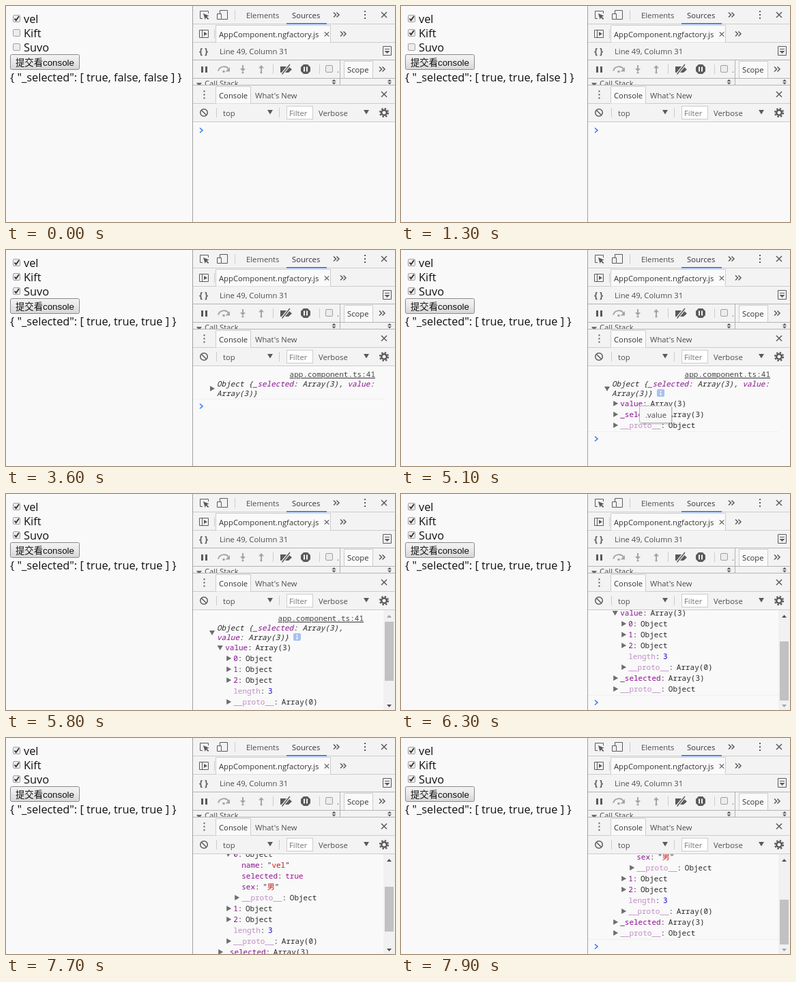
Recreate the animation shown at these times as an HTML page. Size 570 by 318 pixels, loop 8 s.

```html
<!DOCTYPE html>
<html lang="en">
<head>
<meta charset="utf-8">
<title>Checkbox form and console</title>
<style>
html, body { margin: 0; width: 100%; height: 100%; overflow: hidden; background: #f9f9f9; }
svg { display: block; }
text { white-space: pre; }
.page { font: 16.35px "Open Sans", "Noto Sans", sans-serif; fill: #111; }
.btn { font: 13.333px "Liberation Sans", "Noto Sans CJK SC", "Noto Sans CJK", sans-serif; fill: #111; }
.ui { font: 11.25px "Open Sans", "Noto Sans", sans-serif; fill: #4c4c4c; }
.log { font: 11px "Noto Sans Mono", "DejaVu Sans Mono", monospace; fill: #2a2a2a; }
.it { font-style: italic; }
.link { text-decoration: underline; text-anchor: end; fill: #444; }
.key { fill: #881391; }
.dim { fill: #c08fc6; }
.str { fill: #c41a16; }
.num { fill: #1c00cf; }
.bool { fill: #aa0d91; }
.arrow { fill: #6e6e6e; }
.line { fill: none; stroke: #ccc; }
.ico { fill: none; stroke: #5a5a5a; stroke-width: 1.5; }
.thin { stroke-width: 1; }
.dark { fill: #5a5a5a; }
.pale { fill: none; stroke: #a5a5a5; stroke-width: 2; }
.prompt { fill: none; stroke: #367cf1; stroke-width: 1.6; }

.anim { animation: 8s step-end infinite; }
.hover { animation-name: hover; }
.press { animation-name: press; }
.second { animation-name: second; }
.third { animation-name: third; }
.json0 { animation-name: json0; }
.json1 { animation-name: json1; }
.idle { animation-name: idle; }
.closed { animation-name: closed; }
.opened { animation-name: opened; }
.tip { animation-name: tip; }
.tree { animation-name: tree; }
.scroll { animation-name: scroll; }
.item { animation-name: item; }
.itemShut { animation-name: itemShut; }
.rest { animation-name: rest; }
.thumb { animation-name: thumb; }
.up { animation-name: up; }
.down { animation-name: down; }
@keyframes hover { 0%, 11.25%, 45%, 100% { opacity: 0 } 8.75%, 30% { opacity: 1 } }
@keyframes press { 0%, 40%, 100% { opacity: 0 } 38.75% { opacity: 1 } }
@keyframes second { 0% { opacity: 0 } 16.25%, 100% { opacity: 1 } }
@keyframes third { 0% { opacity: 0 } 22.5%, 100% { opacity: 1 } }
@keyframes json0 { 0% { opacity: 1 } 16.25%, 100% { opacity: 0 } }
@keyframes json1 { 0%, 22.5%, 100% { opacity: 0 } 16.25% { opacity: 1 } }
@keyframes idle { 0% { opacity: 1 } 40%, 100% { opacity: 0 } }
@keyframes closed { 0%, 57.5%, 100% { opacity: 0 } 40% { opacity: 1 } }
@keyframes opened { 0%, 70%, 100% { opacity: 0 } 57.5% { opacity: 1 } }
@keyframes tip { 0%, 67.5%, 100% { opacity: 0 } 62.5%, 66.25% { opacity: .5 } 63.75% { opacity: 1 } }
@keyframes tree { 0% { opacity: 0 } 70%, 100% { opacity: 1 } }
@keyframes item { 0% { opacity: 0 } 87.5%, 100% { opacity: 1 } }
@keyframes itemShut { 0% { opacity: 1 } 87.5%, 100% { opacity: 0 } }
@keyframes rest { 0% { transform: none } 87.5%, 100% { transform: translateY(64px) } }
@keyframes scroll {
  0% { transform: none }
  77.5% { transform: translateY(-25px) }
  78.75% { transform: translateY(-51px) }
  96.25% { transform: translateY(-71px) }
  97.5% { transform: translateY(-100px) }
  98.75%, 100% { transform: translateY(-115px) }
}
@keyframes thumb {
  0% { y: 188px; height: 87px }
  77.5% { y: 203px; height: 87px }
  78.75% { y: 217px; height: 87px }
  87.5% { y: 210px; height: 66px }
  96.25% { y: 219px; height: 66px }
  97.5% { y: 232px; height: 66px }
  98.75%, 100% { y: 238px; height: 66px }
}
@keyframes up { 0% { fill: #a3a3a3 } 77.5%, 100% { fill: #505050 } }
@keyframes down { 0%, 87.5% { fill: #505050 } 78.75%, 98.75%, 100% { fill: #a3a3a3 } }
</style>
</head>
<body>
<svg width="570" height="318">
  <defs>
    <linearGradient id="face" x2="0" y2="1"><stop stop-color="#f2f2f2"/><stop offset=".4" stop-color="#ebebeb"/><stop offset="1" stop-color="#d6d6d6"/></linearGradient>
    <g id="box"><rect x=".5" y=".5" width="10" height="10" rx="1.5" fill="#ececec" stroke="#a0a0a0"/></g>
    <path id="tick" d="M2.5 5.5L4.7 8.2L9 2" fill="none" stroke="#333" stroke-width="1.9"/>
    <path id="close" class="ico" d="M-4 -4L4 4M4 -4L-4 4"/>
    <path id="more" class="ico" d="M-4 -3.5l3.5 3.5l-3.5 3.5M.5 -3.5l3.5 3.5l-3.5 3.5"/>
    <path id="dots" class="dark" d="M-1 -6h2v2h-2zM-1 -1h2v2h-2zM-1 4h2v2h-2z"/>
    <path id="drop" class="dark" d="M0 0h8l-4 6.5z"/>
    <path id="prompt" class="prompt" d="M-2 -3.5l4 3.5l-4 3.5"/>
    <clipPath id="view"><rect x="274" y="171" width="296" height="147"/></clipPath>
    <clipPath id="stack"><rect x="274" y="107" width="296" height="9"/></clipPath>
  </defs>
  <rect width="570" height="318" fill="#f9f9f9"/>

  <!-- form -->
  <g class="page">
    <use href="#box" x="10" y="13"/><use href="#tick" x="10" y="13"/>
    <use href="#box" x="10" y="34"/><use href="#tick" x="10" y="34" class="anim second"/>
    <use href="#box" x="10" y="55"/><use href="#tick" x="10" y="55" class="anim third"/>
    <text x="26" y="25">vel</text>
    <text x="26" y="46">Kift</text>
    <text x="26" y="67">Suvo</text>
    <text x="6" y="111" class="anim json0">{ "_selected": [ true, false, false ] }</text>
    <text x="6" y="111" class="anim json1">{ "_selected": [ true, true, false ] }</text>
    <text x="6" y="111" class="anim third">{ "_selected": [ true, true, true ] }</text>
  </g>
  <rect x="6.5" y="71.5" width="101" height="22" rx="2" fill="url(#face)" stroke="#8a8a8a"/>
  <rect x="6.5" y="71.5" width="101" height="22" rx="2" fill="#fff" fill-opacity=".25" stroke="#777" class="anim hover"/>
  <rect x="6.5" y="71.5" width="101" height="22" rx="2" fill="#d2d2d2" stroke="#666" class="anim press"/>
  <text x="14" y="88" class="btn">提交看console</text>

  <!-- tool panels -->
  <rect x="274" width="296" height="171" fill="#f3f3f3"/>
  <path class="line" d="M274 26.5H570M274 53.5H570M274 143.5H570M274 170.5H570M335.5 6V20M305.5 34V48M391.5 86V100M459.5 86V100M308.5 150V164M400.5 150V164"/>
  <path class="line" style="stroke:#b4b4b4" d="M274 79.5H570M274 106.5H570M274 116.5H570M489.5 80V116"/>
  <rect x="411" y="25" width="59" height="2" fill="#4285f4"/>
  <g fill="#fafafa" stroke="#ccc">
    <path d="M307.5 53.5V28.5H475.5V53.5"/>
    <path d="M495.5 106V81.5H537.5V106"/>
    <path d="M307.5 143.5V118.5H358.5V143.5"/>
    <rect x="411.5" y="147.5" width="38" height="19" fill="#fff"/>
  </g>
  <g class="ui">
    <text x="352" y="17.5">Elements</text>
    <text x="419" y="17.5" fill="#333">Sources</text>
    <text x="312" y="45.5" fill="#333">AppComponent.ngfactory.js</text>
    <text x="283" y="70.5" font-size="13" font-weight="700" fill="#5a5a5a" letter-spacing="3">{}</text>
    <text x="313" y="71">Line 49, Column 31</text>
    <text x="485" y="98">.</text>
    <text x="500" y="98" fill="#333">Scope</text>
    <text x="312" y="135.5" fill="#333">Console</text>
    <text x="365" y="135.5">What's New</text>
    <text x="318" y="161.5">top</text>
    <text x="415" y="161.5" fill="#757575">Filter</text>
    <text x="458" y="161.5">Verbose</text>
    <g clip-path="url(#stack)">
      <path class="arrow" d="M279 113h8l-4 6z"/>
      <text x="291" y="118">Call Stack</text>
      <rect x="475" y="107" width="14" height="9" fill="#f1f1f1"/>
      <rect x="556" y="107" width="14" height="9" fill="#f1f1f1"/>
      <path class="dark" d="M477.5 111l3-3l3 3zM477.5 112.5h6l-3 3zM559 111l3-3l3 3zM559 112.5h6l-3 3z"/>
    </g>
  </g>
  <use href="#more" x="484" y="13"/><use href="#dots" x="526" y="13"/><use href="#close" x="554" y="13"/>
  <use href="#close" transform="translate(470 41.5) scale(.8)"/><use href="#more" x="494" y="41"/>
  <use href="#more" x="551" y="93"/>
  <use href="#dots" x="290.5" y="130.5"/><use href="#close" x="554" y="130"/>
  <use href="#drop" x="383" y="153"/><use href="#drop" x="524" y="153"/>

  <!-- inspect, device, sidebar, drawer -->
  <path class="ico thin" d="M288 18.5H284.5V7.5H296.5V11"/>
  <path class="dark" d="M289 11l8.5 3.5l-3.2 1.2l3 3l-1.3 1.3l-3-3l-1.3 3z"/>
  <path class="ico thin" d="M313.500 11V6.500H324.500V19.500H316M309.500 11.500h6v8h-6z"/>
  <path class="ico thin" d="M283.5 35.5h13v11h-13zM287.500 35.5v11"/>
  <path class="dark" d="M290 38l5 3l-5 3z"/>
  <path class="ico thin" d="M552.5 59.5h12v13h-12zM555 63.5h7"/>
  <path class="dark" d="M554.5 66h8l-4 4z"/>

  <!-- debugger buttons -->
  <path class="dark" d="M286 89h3v9h-3zM292 89h3v9h-3z"/>
  <path class="pale" d="M311 95.5C313 88 323 87.5 326 93M347 87v7M374 97v-7"/>
  <path fill="#a5a5a5" d="M328 90v6.5h-6.5zM343 92h8l-4 4.5zM370 91.5h8l-4-4.5z"/>
  <g fill="#a5a5a5"><circle cx="319" cy="96.5" r="1.8"/><circle cx="347" cy="98" r="1.6"/><circle cx="374" cy="98" r="1.6"/></g>
  <path class="dark" d="M402 89h12l5 4.5l-5 4.5h-12z"/>
  <path d="M404 101L416 86" stroke="#f3f3f3" stroke-width="4"/>
  <path class="ico" d="M404.5 100.5L416 86"/>
  <path class="dark" d="M436 86h6l4 4v6l-4 4h-6l-4-4v-6z"/>
  <path fill="#f3f3f3" d="M436 89.5h2v7h-2zM440 89.5h2v7h-2z"/>
  <use href="#box" x="468" y="87"/>

  <!-- console toolbar -->
  <circle class="ico" cx="290" cy="157" r="5.3"/>
  <path class="ico" d="M286.5 153.5l7 7"/>
  <circle class="ico" cx="554" cy="157" r="3.8" style="stroke-width:2.6"/>
  <circle class="ico" cx="554" cy="157" r="6" style="stroke-width:2.2" stroke-dasharray="2.4 2.312"/>

  <!-- console output -->
  <g clip-path="url(#view)" class="log">
    <use href="#prompt" x="286" y="183" class="anim idle"/>
    <g id="closed" class="anim closed"></g>
    <g id="opened" class="anim opened"></g>
    <g class="anim tree">
      <g id="tree" class="anim scroll"></g>
      <rect x="553" y="171" width="17" height="147" fill="#f1f1f1"/>
      <path class="anim up" d="M558 182h7l-3.5-4z"/>
      <path class="anim down" d="M558 310h7l-3.5 4z"/>
      <rect x="555" y="188" width="13" height="87" fill="#c1c1c1" class="anim thumb"/>
    </g>
  </g>
  <g class="anim tip">
    <rect x="351" y="231" width="47" height="26" rx="2" fill="#000" opacity=".12"/>
    <rect x="349.5" y="229.5" width="47" height="25" rx="2" fill="#f7f7f7" stroke="#b5b5b5"/>
    <text x="358" y="246.5" class="ui">.value</text>
  </g>
  <path d="M273.5 0V318" stroke="#a0a0a0"/>
</svg>
<script>
const put = (id, ...parts) => document.getElementById(id).innerHTML = parts.join('');
const span = (cls, s) => `<tspan class="${cls}">${s}</tspan>`;
const quoted = s => `"${span('str', s)}"`;
const shutArrow = (x, y) => `<path class="arrow" d="M${x} ${y - 4}l7 4l-7 4z"/>`;
const openArrow = (x, y) => `<path class="arrow" d="M${x} ${y - 3}h8l-4 7z"/>`;

// One property line; arrow is '+' (shut), '-' (open) or '' (leaf)
function row(depth, line, arrow, key, value, cls = 'key') {
  const x = 321.2 + 12 * depth, y = 230 + 16 * line;
  const mark = arrow === '+' ? shutArrow(x - 10, y - 4) : arrow === '-' ? openArrow(x - 11.5, y - 4) : '';
  return `${mark}<text x="${x}" y="${y}">${span(cls, key)}: <tspan dx="-2">${value}</tspan></text>`;
}
const proto = (depth, line, type) => row(depth, line, '+', '__proto__', type, 'dim');

function head(right, first, second, arrow) {
  return `<text class="link" x="${right}" y="187">app.component.ts:41</text>` + arrow +
    `<text class="it" x="309" y="201">${first}</text><text class="it" x="309" y="214.5">${second}</text>`;
}
const info = x => `<rect x="${x}" y="205" width="11" height="11" rx="2" fill="#a6c1ee"/>
  <path d="M${x + 5.5} 207v2M${x + 5.5} 210v4" stroke="#fff" stroke-width="1.6"/>`;
const foot = y => `<path d="M274 ${y - 10.5}H553" stroke="#f0f0f0"/><use href="#prompt" x="286" y="${y}"/>`;
const group = (cls, ...parts) => `<g class="anim ${cls}">${parts.join('')}</g>`;

const wide = [`Object {${span('key', '_selected')}: Array(3), ${span('key', 'value')}:`, 'Array(3)}'];
const narrow = [`Object {${span('key', '_selected')}: Array(3),`, `${span('key', 'value')}: Array(3)}`];

put('closed', head(541, ...wide, shutArrow(299, 204)), foot(230));

put('opened', head(541, ...wide, openArrow(298, 204)), info(375),
  row(0, 0, '+', 'value', 'Array(3)'),
  row(0, 1, '+', '_selected', 'Array(3)'),
  proto(0, 2, 'Object'), foot(278));

put('tree', head(524, ...narrow, openArrow(298, 204)), info(421),
  row(0, 0, '-', 'value', 'Array(3)'),
  group('itemShut', row(1, 1, '+', '0', 'Object')),
  group('item',
    row(1, 1, '-', '0', 'Object'),
    row(2, 2, '', 'name', quoted('vel')),
    row(2, 3, '', 'selected', span('bool', 'true')),
    row(2, 4, '', 'sex', quoted('男')),
    proto(2, 5, 'Object')),
  group('rest',
    row(1, 2, '+', '1', 'Object'),
    row(1, 3, '+', '2', 'Object'),
    row(1, 4, '', 'length', span('num', '3'), 'dim'),
    proto(1, 5, 'Array(0)'),
    row(0, 6, '+', '_selected', 'Array(3)'),
    proto(0, 7, 'Object'), foot(358)));
</script>
</body>
</html>
```
